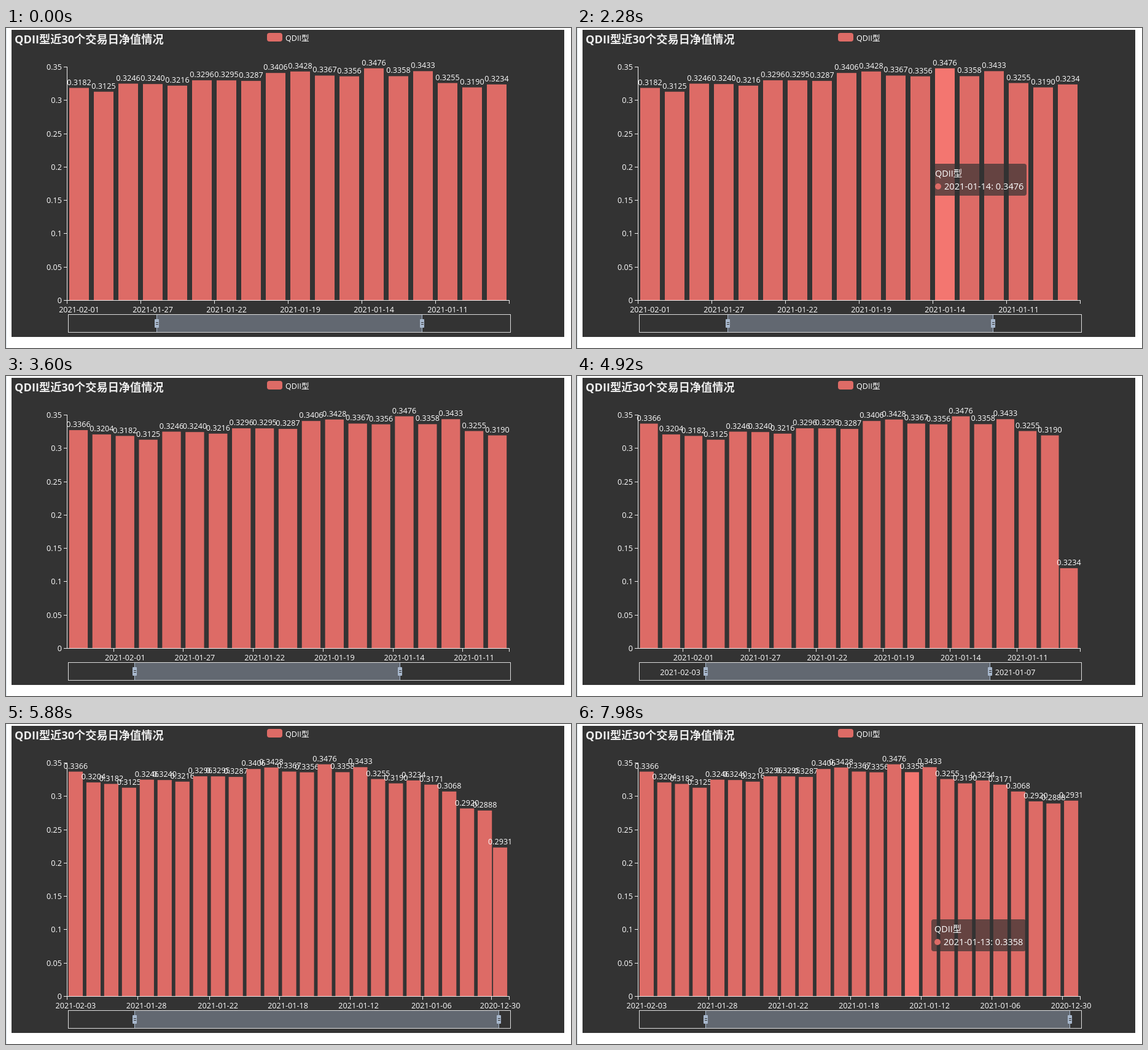
Animation, 920 px wide and 521 px high, one loop 8000 ms. Source, as an HTML page with a canvas:

```html
<!DOCTYPE html>
<html lang="zh">
<head>
<meta charset="utf-8">
<title>Bar chart with zoom slider</title>
<style>
  html, body { margin: 0; width: 100%; height: 100%; overflow: hidden; background: #fff; }
  canvas { display: block; }
</style>
</head>
<body>
<canvas id="stage" width="920" height="521"></canvas>
<script>
const ctx = document.getElementById('stage').getContext('2d');
const LOOP = 8000, STEP = 60, REFRESH = 17;
const FONT = '"Open Sans", "Noto Sans CJK SC", "Noto Sans CJK", sans-serif';
const RED = '#dd6b66', RED_HOVER = '#f37670', LIGHT = '#eee', STEEL = '#a7b7cc';
const PLOT = { left: 99, right: 819, top: 63, bottom: 443, max: 0.35 };
const TRACK = { x: 101.5, y: 466.5, w: 720, h: 29 };
const TIP = { w: 154, h: 52, gap: 20, lag: 120, edge: 909 };
const SERIES = 'QDII型';

// Net values in 1/10000, one per trading day going back from 2021-02-03; indices start at FIRST
const FIRST = 4, TOTAL = 30;
const VALUES = [3366, 3204, 3182, 3125, 3246, 3240, 3216, 3296, 3295, 3287, 3406, 3428, 3367,
  3356, 3476, 3358, 3433, 3255, 3190, 3234, 3171, 3068, 2920, 2888, 2931];
const DATES = [];
for (let d = new Date(Date.UTC(2021, 1, 3)); DATES.length < VALUES.length; d.setUTCDate(d.getUTCDate() - 1)) {
  const iso = d.toISOString().slice(0, 10);
  if (d.getUTCDay() % 6 && iso !== '2021-01-01') DATES.push(iso);
}
const valueOf = i => VALUES[i - FIRST] / 10000;
const dateOf = i => DATES[i - FIRST];

const mix = (a, b, p) => a + (b - a) * p;
const cubicOut = p => 1 - (1 - Math.min(1, p)) ** 3;

function track(keys, t, col = 1) {
  const n = keys.findIndex(k => k[0] > t);
  if (n === 0) return keys[0][col];
  if (n < 0) return keys.at(-1)[col];
  const [a, b] = [keys[n - 1], keys[n]];
  return mix(a[col], b[col], (t - a[0]) / (b[0] - a[0]));
}

// The slider window (time, percent): first moved as a whole, then widened by its right handle
const SHIFT = [[2480, 20], [2900, 15.5], [3000, 15]];
const WIDEN = [[4700, 60], [4800, 64], [5240, 65], [5270, 69.8], [5340, 72.5], [5355, 77],
  [5400, 78.5], [5650, 78.5], [5780, 82.3]];
const SLIDER_HOVER = [[2460, 3040], [4200, 5840]];
const zoomStart = t => track(SHIFT, t);
const zoomEnd = t => track(SHIFT, t) + track(WIDEN, t);

// The chart updates when the range of bars changes, and once more on letting go of the handle
const VIEWS = [];
for (let t = 0; t < LOOP; t += REFRESH) {
  const [first, last] = [zoomStart(t), zoomEnd(t)].map(p => Math.round(p / 100 * (TOTAL - 1)));
  const old = VIEWS.at(-1);
  if (!old || old.first !== first || old.last !== last || t === WIDEN.at(-1)[0]) {
    VIEWS.push({ t, first, last, count: last - first + 1 });
  }
}
const viewAt = t => VIEWS.findLastIndex(v => v.t <= t);
const inView = (v, i) => i >= v.first && i <= v.last;
const hasLabel = (v, i) => inView(v, i) && i % (v.count > 24 ? 4 : 3) === 0;

// Cursor paths over the bars: time, x, y
const CURSORS = [
  [[420, 640, 230], [900, 194, 208], [1200, 120, 208], [1440, 120, 206], [1920, 453, 202],
    [2160, 558, 201], [2280, 605, 201], [2460, 709, 220]],
  [[6360, 746, 280], [7980, 542, 299]],
];

// Centre, band width and growth of an item; each update eases on from the pose it interrupts
function place(i, t, shown, n = viewAt(t)) {
  const view = VIEWS[n];
  if (!shown(view, i)) return null;
  const band = (PLOT.right - PLOT.left) / view.count;
  const goal = { x: PLOT.left + (i - view.first + 0.5) * band, band, grow: 1 };
  if (n === 0) return goal;
  const from = place(i, view.t, shown, n - 1);
  if (!from) return { ...goal, grow: cubicOut((t - view.t) / 1000) };
  const p = cubicOut((t - view.t) / 300);
  return { x: mix(from.x, goal.x, p), band: mix(from.band, goal.band, p), grow: mix(from.grow, 1, p) };
}

function rect(x, y, w, h, color) {
  ctx.fillStyle = color;
  ctx.fillRect(x, y, w, h);
}

function round(x, y, w, h, r, color) {
  ctx.fillStyle = color;
  ctx.beginPath();
  ctx.roundRect(x, y, w, h, r);
  ctx.fill();
}

// y is the middle of the digits
function text(str, x, y, { size = 12.6, align = 'left', color = '#fff', weight = 400 } = {}) {
  ctx.font = `${weight} ${size}px ${FONT}`;
  ctx.textAlign = align;
  ctx.fillStyle = color;
  ctx.fillText(str, x, y + size * 0.36);
}

function drawFrame() {
  rect(0, 0, 920, 521, '#fff');
  rect(0, 0, 1, 521, '#d9e2ea');
  rect(9, 3, 900, 500, '#333');
  text('QDII型近30个交易日净值情况', 14, 18, { size: 18.2, weight: 700, color: LIGHT });
  round(425, 8, 25, 14, 4, RED);
  text(SERIES, 455, 16);
}

function drawAxes(t) {
  const { left, right, top, bottom } = PLOT;
  rect(left, top, 1, bottom - top + 1, LIGHT);
  rect(left, bottom, right - left + 1, 1, LIGHT);
  for (let k = 0; k <= 7; k++) {
    const y = Math.round(mix(bottom, top, k / 7));
    rect(left - 5, y, 5, 1, LIGHT);
    text(String(+(k * 0.05).toFixed(2)), left - 8, y + 0.5, { align: 'right' });
  }
  DATES.forEach((date, n) => {
    const p = place(n + FIRST, t, hasLabel);
    if (!p) return;
    rect(Math.round(p.x - p.band / 2), bottom, 1, 6, LIGHT);
    text(date, p.x, 458, { align: 'center' });
  });
  rect(right, bottom, 1, 6, LIGHT);
}

function drawBars(t, hovered) {
  VALUES.forEach((_, n) => {
    const i = n + FIRST, p = place(i, t, inView);
    if (!p) return;
    const h = valueOf(i) / PLOT.max * (PLOT.bottom - PLOT.top) * p.grow;
    const w = p.band * 0.8, y = PLOT.bottom - h;
    rect(p.x - w / 2, y, w, h, i === hovered ? RED_HOVER : RED);
    text(valueOf(i).toFixed(4), p.x, y - 9.5, { align: 'center' });
  });
}

function drawSlider(t) {
  const { x, y, w, h } = TRACK;
  const [a, b] = [zoomStart(t), zoomEnd(t)].map(p => x + w * p / 100);
  rect(a, y, b - a, h, 'rgba(167,183,204,0.4)');
  ctx.strokeStyle = '#ddd';
  ctx.strokeRect(x, y, w, h);
  for (const pos of [a, b]) {
    const hx = Math.floor(pos);
    rect(hx, y + 0.5, 1, h - 1, STEEL);
    round(hx - 3, 474, 7, 14, 1, STEEL);
    for (const dy of [479, 482]) rect(hx - 1, dy, 4, 1, '#333');
  }
  if (SLIDER_HOVER.some(([from, to]) => t >= from && t < to)) {
    const view = VIEWS[viewAt(t)];
    text(dateOf(view.first), a - 8.5, 482, { align: 'right' });
    text(dateOf(view.last), b + 8.5, 482);
  }
}

function barUnder(x, t) {
  const view = VIEWS[viewAt(t)];
  return view.first + Math.floor((x - PLOT.left) / (PLOT.right - PLOT.left) * view.count);
}

// The tip trails the cursor and flips to its left near the chart edge
function drawTip(path, t, i) {
  const [cx, cy] = [1, 2].map(col => track(path, t - TIP.lag, col));
  const flip = cx + TIP.gap + TIP.w > TIP.edge;
  const x = Math.round(flip ? cx - TIP.gap - TIP.w : cx + TIP.gap), y = Math.round(cy + TIP.gap);
  round(x, y, TIP.w, TIP.h, 4, 'rgba(50,50,50,0.7)');
  text(SERIES, x + 5, y + 16, { size: 14.4 });
  round(x + 5, y + 32, 10, 10, 5, RED);
  text(`${dateOf(i)}: ${valueOf(i).toFixed(4)}`, x + 20, y + 37, { size: 14.6 });
}

function draw(t) {
  const path = CURSORS.find(keys => t >= keys[0][0] && t < keys.at(-1)[0] + STEP);
  const bar = path && barUnder(track(path, t), t);
  drawFrame();
  drawAxes(t);
  drawBars(t, bar);
  drawSlider(t);
  if (path) drawTip(path, t, bar);
}

const origin = performance.now();
function tick() {
  const t = (performance.now() - origin) % LOOP;
  draw(Math.floor(t / STEP) * STEP);
  requestAnimationFrame(tick);
}
tick();
</script>
</body>
</html>
```
